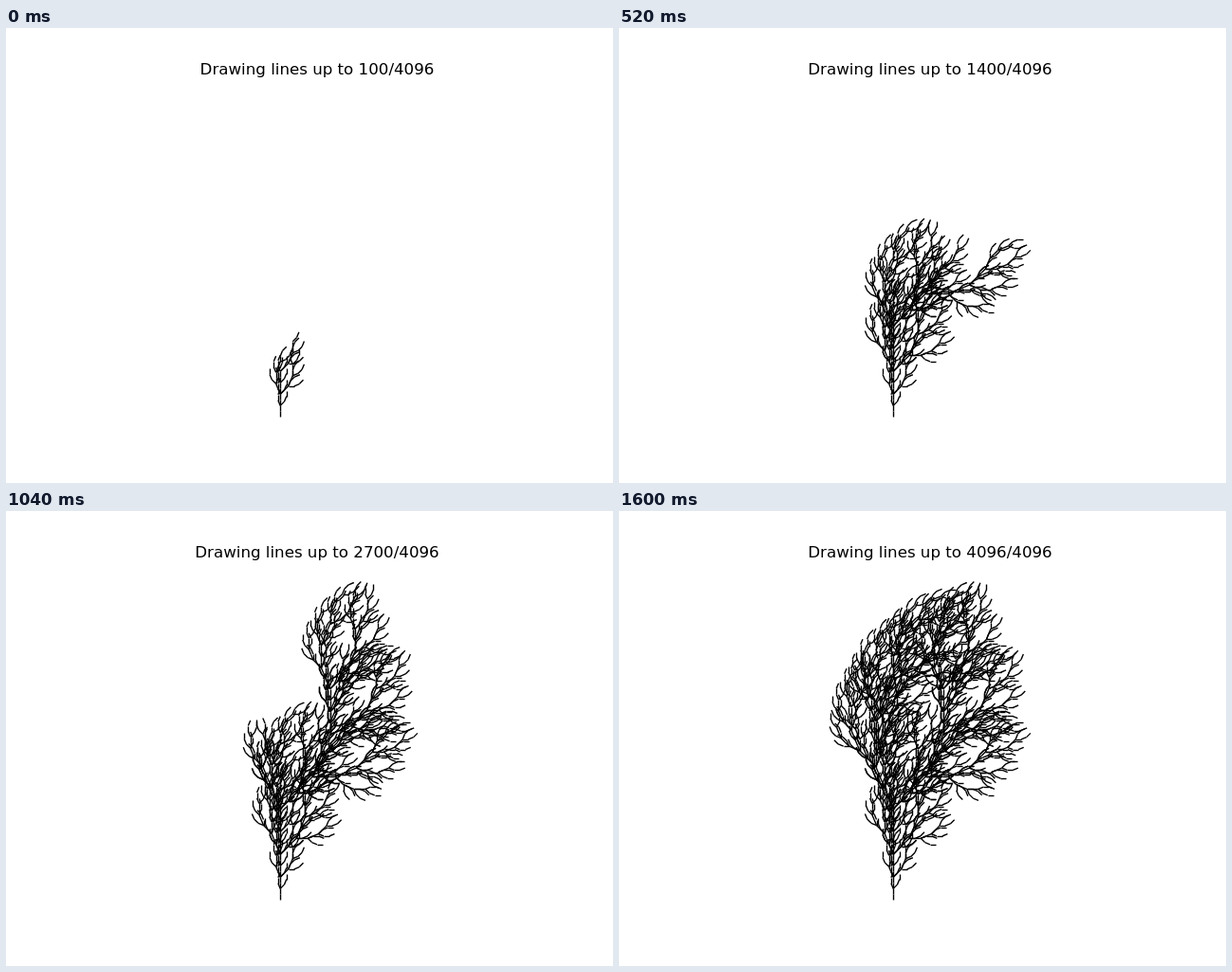
An HTML page with a canvas for the animation above (1640 ms loop, 640 by 480 pixels).

```html
<!DOCTYPE html>
<html lang="en">
<head>
<meta charset="utf-8">
<title>Growing plant</title>
<style>
  html, body { margin: 0; width: 100%; height: 100%; overflow: hidden; background: #fff; }
  canvas, svg { position: absolute; left: 0; top: 0; width: 640px; height: 480px; }
  text { font: 16.667px "DejaVu Sans", sans-serif; text-anchor: middle; fill: #000; }
</style>
</head>
<body>
<canvas id="plant" width="640" height="480"></canvas>
<svg viewBox="0 0 640 480"><text id="title" x="328" y="49"></text></svg>
<script>
  const RULE = 'FF+[+F-F-F]-[-F+F+F]';
  const DEPTH = 4, TURN = Math.PI / 8;
  const STEP_MS = 40, LOOP_MS = 1640, BATCH = 100;
  const WIDTH = 100 / 72;

  const ctx = document.getElementById('plant').getContext('2d');
  const title = document.getElementById('title');

  // Turtle walk over the expanded L-system; heading 0 is up, + turns right.
  function walk() {
    const lines = [], stack = [];
    let x = 0, y = 0, dir = 0;
    const grow = depth => {
      if (depth === 0) {
        const nx = x + Math.sin(dir * TURN), ny = y + Math.cos(dir * TURN);
        lines.push([x, y, nx, ny]);
        x = nx;
        y = ny;
        return;
      }
      for (const c of RULE) {
        if (c === 'F') grow(depth - 1);
        else if (c === '+') dir++;
        else if (c === '-') dir--;
        else if (c === '[') stack.push([x, y, dir]);
        else [x, y, dir] = stack.pop();
      }
    };
    grow(DEPTH);
    return lines;
  }

  // Fit the plant between y = 74.4 and 410.4, centred on x = 328.
  function fit(lines) {
    let left = 0, right = 0, low = 0, high = 0;
    for (const [, , x, y] of lines) {
      left = Math.min(left, x);
      right = Math.max(right, x);
      low = Math.min(low, y);
      high = Math.max(high, y);
    }
    const scale = 336 / (high - low), mid = (left + right) / 2;
    const px = x => 328 + (x - mid) * scale;
    const py = y => 410.4 - (y - low) * scale;
    return lines.map(([x0, y0, x1, y1]) => {
      const line = [px(x0), py(y0), px(x1), py(y1)];
      const straight = Math.abs(x1 - x0) < 1e-6 || Math.abs(y1 - y0) < 1e-6;
      return straight ? line.map(v => Math.floor(v + 0.5) + 0.5) : line;
    });
  }

  const lines = fit(walk());
  let shown = 0;

  function show(count) {
    if (count === shown) return;
    if (count < shown) {
      ctx.clearRect(0, 0, 640, 480);
      shown = 0;
    }
    ctx.lineWidth = WIDTH;
    ctx.strokeStyle = '#000';
    for (; shown < count; shown++) {
      const [x0, y0, x1, y1] = lines[shown];
      ctx.beginPath();
      ctx.moveTo(x0, y0);
      ctx.lineTo(x1, y1);
      ctx.stroke();
    }
    title.textContent = `Drawing lines up to ${count}/${lines.length}`;
  }

  function tick() {
    const step = Math.floor(performance.now() % LOOP_MS / STEP_MS);
    show(Math.min(lines.length, (step + 1) * BATCH));
    requestAnimationFrame(tick);
  }
  tick();
</script>
</body>
</html>
```
